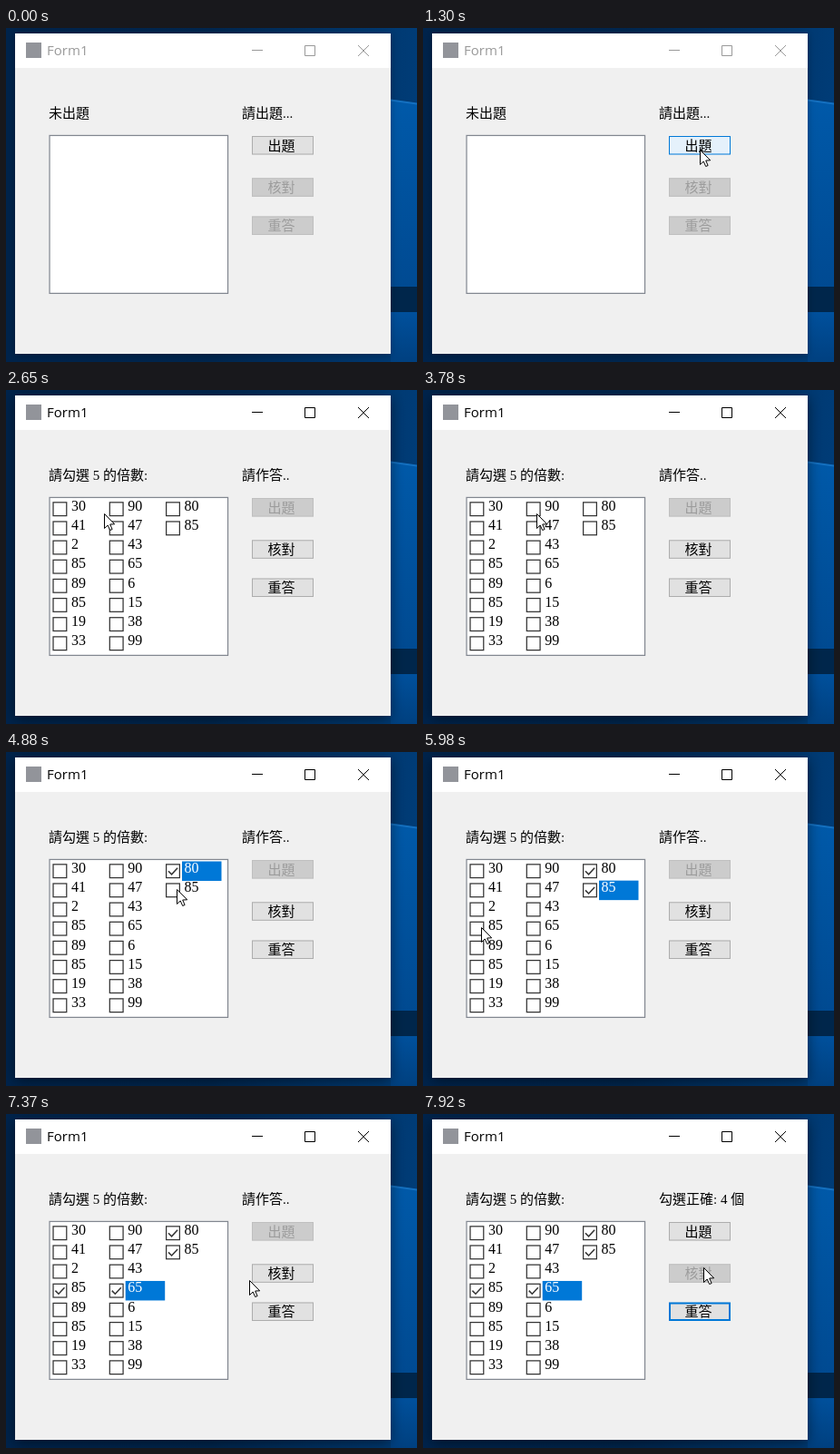
Animation, 453 px wide and 368 px high, one loop 8000 ms. Source, as an HTML page with a canvas:

```html
<!DOCTYPE html>
<html lang="zh-Hant">
<head>
<meta charset="utf-8">
<title>Form1</title>
<style>
html, body { margin: 0; width: 100%; height: 100%; overflow: hidden; background: #00234b; }
canvas { display: block; }
</style>
</head>
<body>
<canvas id="stage" width="453" height="368"></canvas>
<script>
const ctx = document.getElementById('stage').getContext('2d');
const LOOP = 8000;
const serif = size => `500 ${size}px 'Liberation Serif', 'Noto Sans CJK TC', 'Noto Sans CJK', 'Noto Sans CJK JP', serif`;
const BLUE = '#0078d7';
const ROWS = 8;
const values = '30 41 2 85 89 85 19 33 90 47 43 65 6 15 38 99 80 85'.split(' ');

// Moments at which the form changes
const ACTIVATE = 1430, ASK = 1570, PRESS = 7640, CHECKED = 7780;

const cell = index => ({
  x: 51.4 + 62.3 * Math.floor(index / ROWS),
  y: 120.5 + 21.15 * (index % ROWS)
});
const boxOf = index => {
  const { x, y } = cell(index);
  return [x + 12.3, y + 9.5];
};

// Each move starts when the previous stop is left; "pick" ticks an item at that moment
const ENTRY = [120, 321];
const moves = [
  { start: 330, end: 1100, goal: [305, 134] },
  { start: 2100, end: 2650, goal: [108, 136] },
  { start: 2650, end: 3150, goal: [78, 175] },
  { start: 3150, end: 3710, goal: [125, 136] },
  { start: 3780, end: 4400, goal: boxOf(16) },
  { start: 4600, end: 4880, goal: boxOf(17), pick: 16 },
  { start: 5140, end: 5910, goal: boxOf(3), pick: 17 },
  { start: 6180, end: 6950, goal: boxOf(11), pick: 3 },
  { start: 7080, end: 7370, goal: [268, 183], pick: 11 },
  { start: 7370, end: 7640, goal: [309, 169] }
];

function box(x, y, w, h, fill, stroke, line = 1) {
  ctx.fillStyle = fill;
  ctx.fillRect(x, y, w, h);
  if (!stroke) return;
  ctx.strokeStyle = stroke;
  ctx.lineWidth = line;
  ctx.strokeRect(x + line / 2, y + line / 2, w - line, h - line);
}

function stroke(shape, color, width = 1) {
  ctx.strokeStyle = color;
  ctx.lineWidth = width;
  ctx.stroke(new Path2D(shape));
}

function label(text, x, y, color = '#000', align = 'left', font = serif(15)) {
  ctx.font = font;
  ctx.textAlign = align;
  ctx.fillStyle = color;
  ctx.fillText(text, x, y);
}

function gradient(x0, y0, x1, y1, ...colors) {
  const g = ctx.createLinearGradient(x0, y0, x1, y1);
  colors.forEach((color, i) => g.addColorStop(i / (colors.length - 1), color));
  return g;
}

function desktop() {
  box(0, 0, 453, 368, gradient(0, 0, 453, 0, '#00234b', '#00264f', '#003c77'));
  ctx.fillStyle = gradient(0, 80, 0, 285, '#0059a9', '#004a92');
  ctx.fill(new Path2D('M424 79 L453 83 V285 H424 Z'));
  stroke('M424 79.5 L453 83.5', '#1470c0', 2);
  box(424, 285, 29, 28, '#00264b');
  box(424, 313, 29, 55, gradient(0, 313, 0, 368, '#00509c', '#004080'));
}

function windowFrame(active) {
  ctx.save();
  ctx.shadowColor = active ? 'rgba(0,0,0,.5)' : 'rgba(0,0,0,.3)';
  ctx.shadowBlur = active ? 14 : 8;
  ctx.shadowOffsetY = active ? 3 : 1;
  box(10, 6, 414, 353, '#f0f0f0');
  ctx.restore();
  box(10, 6, 414, 38, '#fff');

  const ink = active ? '#000' : '#999';
  box(22, 16, 17, 17, '#92949a');
  label('Form1', 45, 30, ink, 'left', "15px 'Open Sans', 'Noto Sans', sans-serif");
  stroke('M271 24.5 H283 M329.5 19.5 H340.5 V30.5 H329.5 Z M388 19 L400 31 M400 19 L388 31', ink);
}

const buttonStyles = {
  normal: ['#e1e1e1', '#adadad'],
  disabled: ['#ccc', '#bfbfbf'],
  hover: ['#e5f1fb', BLUE],
  pressed: ['#cce4f7', '#005499'],
  focus: ['#e1e1e1', BLUE, 2]
};

function button(text, y, state) {
  box(271, y, 68, 20.5, ...buttonStyles[state]);
  label(text, 303.5, y + 15.5, state === 'disabled' ? '#9c9c9c' : '#000', 'center');
}

function item(index, checked, selected) {
  const { x, y } = cell(index);
  if (selected) box(x + 18, y, 43.5, 21.5, BLUE);
  box(x, y + 2.7, 16, 16, '#fff', '#333', 1.25);
  if (checked) stroke(`M${x + 3} ${y + 10.7} l3.6 3.6 l6.5 -7`, '#333', 1.5);
  label(values[index], x + 20.5, Math.round(y + 12.5), selected ? '#fff' : '#000', 'left', serif(16));
}

function list(t) {
  box(47.4, 117.8, 197.8, 175.2, '#fff', '#828790', 1.25);
  if (t < ASK) return;
  const picked = moves.filter(m => 'pick' in m && t >= m.start).map(m => m.pick);
  values.forEach((_, i) => item(i, picked.includes(i), picked[picked.length - 1] === i));
}

// Eased travel along a slight bow between stops
function pointer(t) {
  const current = moves.filter(m => t >= m.start).length - 1;
  if (current < 0) return null;
  const { start, end, goal } = moves[current];
  const [x, y] = current ? moves[current - 1].goal : ENTRY;
  const dx = goal[0] - x, dy = goal[1] - y;
  const u = Math.min(1, (t - start) / (end - start));
  const ease = u * u * (3 - 2 * u), bow = 0.1 * Math.sin(Math.PI * ease);
  return [x + dx * ease + dy * bow, y + dy * ease - dx * bow];
}

const ARROW = new Path2D('M0 0 V16 L3.7 12.5 L6.2 18 L8.6 17 L6.2 11.5 L11.2 11.3 Z');

function drawPointer([x, y]) {
  ctx.save();
  ctx.translate(Math.round(x) + 0.5, Math.round(y) + 0.5);
  ctx.fillStyle = '#fff';
  ctx.fill(ARROW);
  stroke(ARROW, '#000');
  ctx.restore();
}

function render(t) {
  const asked = t >= ASK, checked = t >= CHECKED, tip = pointer(t);
  const over = y => tip && tip[0] >= 271 && tip[0] < 339 && tip[1] >= y && tip[1] < y + 21;
  const live = (y, pressed) => over(y) ? (pressed ? 'pressed' : 'hover') : 'normal';

  desktop();
  windowFrame(t >= ACTIVATE);
  label(asked ? '請勾選 5 的倍數:' : '未出題', 47, 99);
  label(checked ? '勾選正確: 4 個' : asked ? '請作答..' : '請出題...', 260, 99);
  list(t);
  button('出題', 119, asked && !checked ? 'disabled' : live(119, t >= ACTIVATE));
  button('核對', 165.3, !asked || checked ? 'disabled' : live(165.3, t >= PRESS));
  button('重答', 207.5, !asked ? 'disabled' : checked ? 'focus' : live(207.5, false));
  if (tip) drawPointer(tip);
}

const began = performance.now();
function tick() {
  render((performance.now() - began) % LOOP);
  requestAnimationFrame(tick);
}
tick();
</script>
</body>
</html>
```
